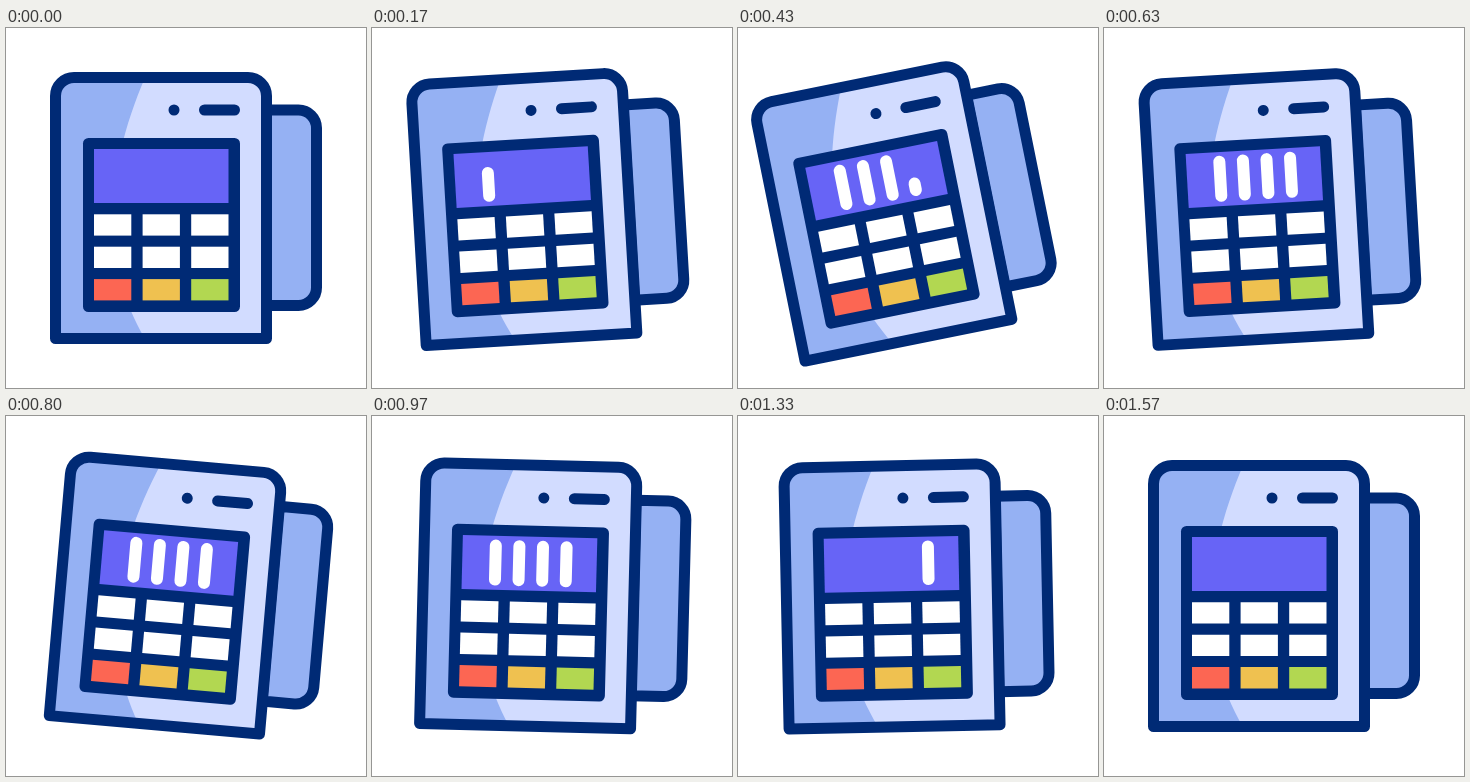
Write an HTML page that moves like this. It is 360 by 360 pixels and loops after 2000 ms.

```html
<!DOCTYPE html>
<html>
<head>
<meta charset="utf-8">
<style>
  html, body { margin: 0; height: 100%; overflow: hidden; background: #fff; }
  svg { display: block; width: 100vw; height: 100vh; }
</style>
</head>
<body>
<svg viewBox="0 0 360 360">
  <g id="terminal" fill="none" stroke="#002a75" stroke-width="11" stroke-linecap="round" stroke-linejoin="round">
    <path fill="#95b1f3" d="M260 82H292.500a18 18 0 0 1 18 18V259.500a18 18 0 0 1-18 18H260z"/>
    <path fill="#d2dcff" stroke="none" d="M49.500 310.500V68a18.500 18.500 0 0 1 18.500-18.500H242a18.500 18.500 0 0 1 18.500 18.500V310.500z"/>
    <path fill="#95b1f3" stroke="none" d="M49.500 310.500V68a18.500 18.500 0 0 1 18.500-18.500H139C97 148 95 235 139 310.500z"/>
    <path d="M49.500 310.500V68a18.500 18.500 0 0 1 18.500-18.500H242a18.500 18.500 0 0 1 18.500 18.500V310.500z"/>
    <path d="M168 82h.01M198.500 82h30"/>
    <rect x="77" y="110" width="157" height="174" rx="5.500" fill="#002a75" stroke="none"/>
    <rect x="88" y="121" width="134.500" height="54" fill="#6764f6" stroke="none"/>
    <g id="keys" stroke="none"></g>
    <g id="bars" stroke="#fff" stroke-width="12"></g>
  </g>
</svg>
<script>
const $ = id => document.getElementById(id);

function add(parent, tag, attrs) {
  const el = document.createElementNS('http://www.w3.org/2000/svg', tag);
  for (const name in attrs) el.setAttribute(name, attrs[name]);
  return parent.appendChild(el);
}

const bottomRow = ['#fc6653', '#efc150', '#b2d751'];
for (let i = 0; i < 9; i++) {
  const col = i % 3, row = Math.floor(i / 3);
  add($('keys'), 'rect', {
    x: 88 + col * 48.6, y: 186.3 + row * 32.4, width: 37.3, height: 21.3,
    fill: row === 2 ? bottomRow[col] : '#fff'
  });
}

const bars = [0, 1, 2, 3].map(() => add($('bars'), 'path', {}));
const barTop = 130.8, barLength = 34;

// Swing keys: [tick, degrees], at 30 ticks per second
const swing = [[0, 0], [14, -11.6], [24, 5], [34, -2.1], [47, 0]];

function ease(from, to, tick) {
  const u = Math.min(1, Math.max(0, (tick - from) / (to - from)));
  return u * u * (3 - 2 * u);
}

function angleAt(tick) {
  let angle = 0;
  for (let i = 1; i < swing.length; i++) {
    const [from, a] = swing[i - 1], [to, b] = swing[i];
    angle += (b - a) * ease(from, to, tick);
  }
  return angle;
}

function draw(ms) {
  const tick = Math.floor((ms % 2000 + 5) * 0.03);
  $('terminal').setAttribute('transform', `rotate(${angleAt(tick)} 171 234)`);
  bars.forEach((bar, i) => {
    const grown = ease(3.15 + 3 * i, 6.15 + 3 * i, tick);
    const erased = ease(30.65 + 3 * i, 33.65 + 3 * i, tick);
    const x = 121.2 + 23.6 * i;
    const top = barTop + barLength * (1 - grown);
    const bottom = barTop + barLength * (1 - erased);
    bar.setAttribute('d', grown > 0 && erased < 1 ? `M${x} ${top}V${bottom}` : '');
  });
}

const start = performance.now();
function loop() {
  draw(performance.now() - start);
  requestAnimationFrame(loop);
}
loop();
</script>
</body>
</html>
```
